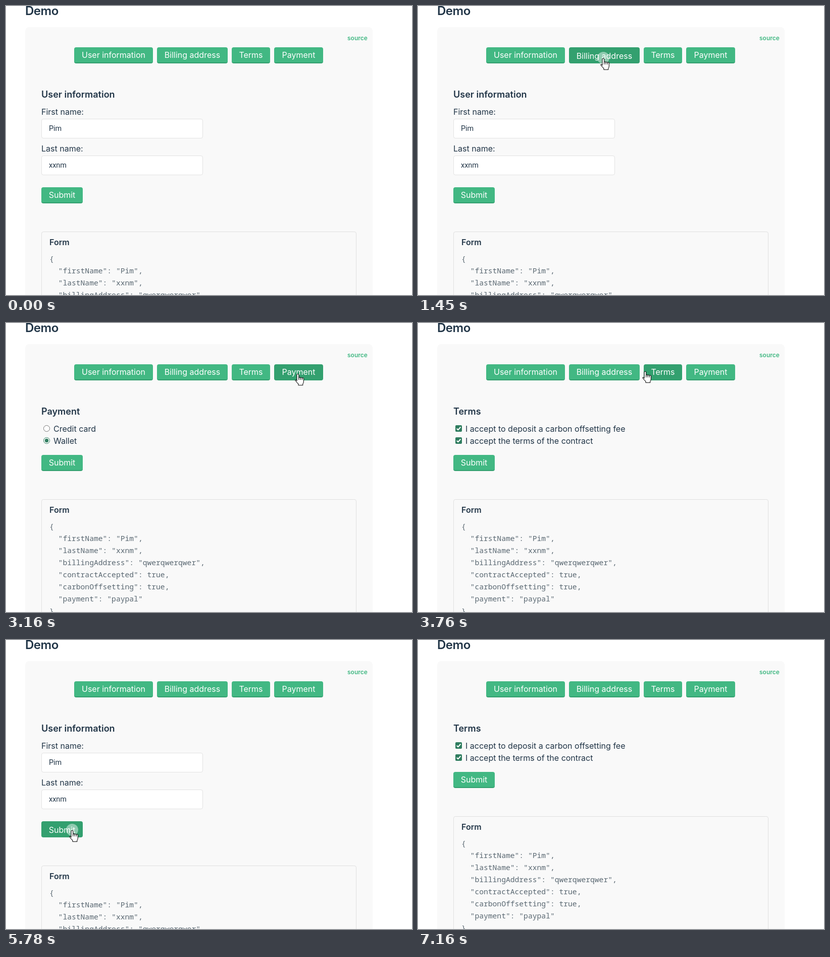
Recreate the animation shown at these times as an HTML page. Size 804 by 574 pixels, loop 7620 ms.

```html
<!DOCTYPE html>
<html lang="en">
<head>
<meta charset="utf-8">
<title>Stepper demo</title>
<style>
  html, body { margin: 0; width: 100%; height: 100%; overflow: hidden; background: #fff; }
  #stage { position: relative; width: 804px; height: 574px; overflow: hidden; cursor: default;
    font: 16px/24px Inter, sans-serif; color: #213547; }
  #stage * { box-sizing: border-box; }
  #stage > *, .page > *, #form > * { position: absolute; white-space: pre; margin: 0; }
  .card { left: 38px; top: 42px; width: 688px; height: 560px; border-radius: 8px; background: #f9f9f9; }
  h1 { left: 38px; top: -6px; font: 600 24px/32px Inter, sans-serif; letter-spacing: -.02em; }
  .link { left: 676px; top: 55px; font-size: 12px; line-height: 18px; font-weight: 600; color: #42b883; }
  .btn { top: 82px; height: 32px; line-height: 30px; text-align: center; color: #fff; background: #42b883;
    border-bottom: 2px solid #33a06f; border-radius: 4px; }
  .btn.hover { background: #33a06f; }
  .btn.active { border-bottom: 0; padding-top: 2px; }
  #submit { left: 70px; width: 82px; }
  .page { inset: 0; }
  h2 { left: 70px; top: 162px; font: 600 18px/28px Inter, sans-serif; }
  .label { left: 70px; }
  .input { left: 70px; width: 320px; height: 39px; padding-left: 14px; background: #fff;
    border: 1px solid #e2e2e2; border-radius: 4px; font: 14.4px/38px Roboto, sans-serif; }
  .input.hover { border-color: #42b883; }
  .choice { left: 94px; }
  .mark { left: 74px; width: 13px; height: 13px; overflow: visible; }
  #form { left: 70px; width: 624px; height: 300px; border: 1px solid #e0e0e0; border-radius: 4px; }
  h3 { left: 15px; top: 8px; font: 600 16px/24px Inter, sans-serif; }
  pre { left: 15px; top: 40px; font: 14.66px/24px "Noto Sans Mono", monospace; color: #5a6872; }
  #pointer { left: 0; top: 0; width: 1px; height: 1px; overflow: visible; }
  #pointer path { fill: #fff; stroke: #111; stroke-width: 1.1; stroke-linejoin: round; }
</style>
</head>
<body>
<div id="stage">
  <div class="card"></div>
  <h1>Demo</h1>
  <div class="link">source</div>

  <div class="btn" style="left:135px;width:156px">User information</div>
  <div class="btn" style="left:299px;width:140px">Billing address</div>
  <div class="btn" style="left:447px;width:76px">Terms</div>
  <div class="btn" style="left:531px;width:97px">Payment</div>

  <div class="page" id="user">
    <h2>User information</h2>
    <div class="label" style="top:198px">First name:</div>
    <div class="input" style="top:224px">Pim</div>
    <div class="label" style="top:271px">Last name:</div>
    <div class="input" style="top:297px">xxnm</div>
  </div>
  <div class="page" id="billing">
    <h2>Billing address</h2>
    <div class="input" style="top:206px">qwerqwerqwer</div>
  </div>
  <div class="page" id="terms">
    <h2>Terms</h2>
    <svg class="mark" style="top:203px"><use href="#checked"/></svg>
    <div class="choice" style="top:198px">I accept to deposit a carbon offsetting fee</div>
    <svg class="mark" style="top:227px"><use href="#checked"/></svg>
    <div class="choice" style="top:222px">I accept the terms of the contract</div>
  </div>
  <div class="page" id="payment">
    <h2>Payment</h2>
    <svg class="mark" style="top:203px"><circle cx="6.5" cy="6.5" r="6" fill="#fff" stroke="#767676"/></svg>
    <div class="choice" style="top:198px">Credit card</div>
    <svg class="mark" style="top:227px"><circle cx="6.5" cy="6.5" r="6" fill="#fff" stroke="#2f7d5f"/><circle cx="6.5" cy="6.5" r="3.7" fill="#2f7d5f"/></svg>
    <div class="choice" style="top:222px">Wallet</div>
  </div>

  <div class="btn" id="submit">Submit</div>
  <div id="form">
    <h3>Form</h3>
    <pre>{
  "firstName": "Pim",
  "lastName": "xxnm",
  "billingAddress": "qwerqwerqwer",
  "contractAccepted": true,
  "carbonOffsetting": true,
  "payment": "paypal"
}</pre>
  </div>

  <svg id="pointer">
    <defs>
      <g id="checked">
        <rect width="13" height="13" rx="2" fill="#2f7d5f"/>
        <path d="M2.8 6.7L5.4 9.3L10.4 3.5" style="fill:none;stroke:#fff;stroke-width:2"/>
      </g>
    </defs>
    <circle id="ring" cy="-1" r="12" fill="#fff" fill-opacity=".45"/>
    <path id="arrow" d="M.5 .5V16.2L4 12.9L6.3 18.4L8.9 17.3L6.6 11.9H11.5Z"/>
    <g id="hand">
      <path d="M-2 14V2.2a1.9 1.9 0 0 1 3.8 0V8a1.7 1.7 0 0 1 3.3 .4a1.7 1.7 0 0 1 3.3 .6a1.6 1.6 0 0 1 3 1.2V15q0 3-1.7 5v2.5H1V20q-3-2.5-6.3-7.2a1.9 1.9 0 0 1 3.3 1.2Z"/>
      <path d="M1.8 8v4M5.1 8.4v3.6M8.4 9v3" style="fill:none"/>
    </g>
    <path id="beam" d="M-3-8H3M0-8V8M-3 8H3"/>
  </svg>
</div>

<script>
const LOOP = 7620, STEP = 70;
const byId = id => document.getElementById(id);

// Spans of time in which the picture advances in 70 ms steps.
const spans = [[70, 770], [1100, 1520], [1780, 2270], [2530, 3160], [3360, 3570],
  [3760, 5300], [5430, 5850], [6110, 7160]];

const views = [[0, 'user'], [1520, 'billing'], [2270, 'terms'], [3160, 'payment'],
  [3570, 'terms'], [4180, 'user'], [5850, 'billing'], [6530, 'terms']];

const submitTop = { user: 360, billing: 269, terms: 262, payment: 262 };
const presses = [700, 1450, 2200, 3090, 3500, 4110, 5780, 6460];

// time, x, y, and whether the move towards this point is eased
const path = [
  [70, 725, 552], [630, 215, 100, true], [1030, 215, 100], [1380, 367, 104, true],
  [1710, 367, 104], [2130, 492, 102, true], [2460, 492, 102], [2530, 499.5, 103],
  [3020, 578, 101, true], [3290, 578, 101], [3430, 465, 97], [3690, 465, 97],
  [3760, 450, 96], [4040, 205, 100], [4180, 205, 100], [4530, 183, 147],
  [4880, 160, 274], [5640, 131, 378], [6040, 131, 378], [6320, 133, 286, true],
  [6530, 133, 286], [6810, 139, 352, true], [7090, 686, 562, true]
];

const lastBefore = (rows, t) => rows.filter(row => row[0] <= t).pop();

function snap(t) {
  const span = lastBefore(spans, t);
  if (!span) return 0;
  const [start, end] = span;
  return Math.min(end, start + Math.floor((t - start) / STEP) * STEP);
}

function pointAt(t) {
  const i = path.findIndex(p => p[0] > t);
  if (i < 1) return (i ? path[path.length - 1] : path[0]).slice(1, 3);
  const [t0, x0, y0] = path[i - 1], [t1, x1, y1, eased] = path[i];
  let u = (t - t0) / (t1 - t0);
  if (eased) u = u * u * (3 - 2 * u);
  return [x0 + (x1 - x0) * u, y0 + (y1 - y0) * u];
}

function show(el, on) { el.style.display = on ? '' : 'none'; }

function draw(time) {
  const t = snap(time);
  const view = lastBefore(views, t)[1];
  const [x, y] = pointAt(t).map(Math.round);
  const visible = t >= 70 && t < 7160;
  const pressed = presses.includes(t);

  for (const page of document.querySelectorAll('.page')) show(page, page.id === view);
  byId('submit').style.top = submitTop[view] + 'px';
  byId('form').style.top = submitTop[view] + 88 + 'px';

  let shape = 'arrow';
  for (const el of document.querySelectorAll('.btn, .input')) {
    const r = el.getBoundingClientRect();
    const over = visible && x >= r.left && x < r.right && y >= r.top && y < r.bottom;
    el.classList.toggle('hover', over);
    el.classList.toggle('active', over && pressed);
    if (over) shape = el.matches('.btn') ? 'hand' : 'beam';
  }

  show(byId('pointer'), visible);
  byId('pointer').style.transform = `translate(${x}px, ${y}px)`;
  for (const id of ['arrow', 'hand', 'beam']) show(byId(id), id === shape);
  show(byId('ring'), pressed);
}

const begin = performance.now();
function tick() {
  draw((performance.now() - begin) % LOOP);
  requestAnimationFrame(tick);
}
tick();
</script>
</body>
</html>
```
